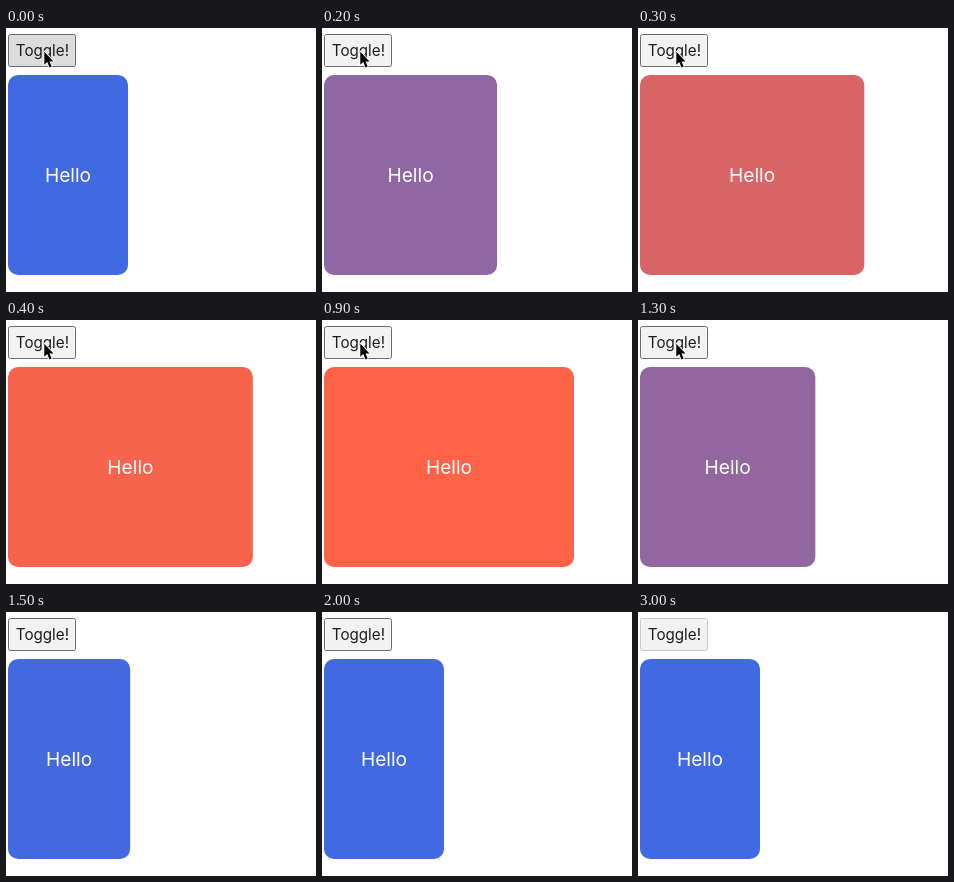
These frames come from a looping animation (310x264 px, 3.2 s). An HTML page:

```html
<!DOCTYPE html>
<html lang="en">
<head>
<meta charset="utf-8">
<title>Toggle</title>
<style>
  html, body { margin: 0; width: 100%; height: 100%; overflow: hidden; background: #fff; }
  svg { display: block; }
  text { font-family: Inter, "Liberation Sans", sans-serif; text-anchor: middle; }
</style>
</head>
<body>
<svg width="310" height="264" viewBox="0 0 310 264">
  <rect id="button" x="2.5" y="6.5" width="67" height="32" rx="2"/>
  <text x="36.4" y="28" font-size="15.2" fill="#1c1c1c">Toggle!</text>
  <rect id="card" x="2" y="47" height="200" rx="10"/>
  <text id="label" y="154" font-size="19.2" fill="#fff">Hello</text>
  <path id="cursor" transform="translate(38.3 23.8)" d="M0 0V13L3 10.3L5.2 15.6L7.4 14.7L5.2 9.6H9.2Z"
        stroke="#fff" stroke-width="1.6" paint-order="stroke"/>
</svg>
<script>
const LOOP = 3200, STEP = 100, DURATION = 400;
const OPEN_AT = 100, CLOSE_AT = 1167;
const BLUE = [65, 105, 225], TOMATO = [255, 99, 71];
const [button, card, label, cursor] =
  ['button', 'card', 'label', 'cursor'].map(id => document.getElementById(id));

const mix = (a, b, k) => a + (b - a) * k;
const bezier = (a, b, u) => 3 * u * (1 - u) * ((1 - u) * a + u * b) + u ** 3;

// CSS "ease": cubic-bezier(.25, .1, .25, 1)
function ease(x) {
  if (x <= 0) return 0;
  if (x >= 1) return 1;
  let lo = 0, hi = 1;
  for (let i = 0; i < 24; i++) {
    const mid = (lo + hi) / 2;
    if (bezier(.25, .25, mid) < x) lo = mid; else hi = mid;
  }
  return bezier(.1, 1, lo);
}

function draw(t) {
  const k = ease((t - OPEN_AT) / DURATION) - ease((t - CLOSE_AT) / DURATION);
  const width = mix(120, 250, k);
  card.setAttribute('width', width);
  card.setAttribute('fill', `rgb(${BLUE.map((c, i) => Math.round(mix(c, TOMATO[i], k)))})`);
  label.setAttribute('x', 2 + width / 2);

  const pressed = t < 100 || (t >= 1100 && t < 1200);
  button.setAttribute('fill', pressed ? '#dcdcdc' : '#f2f2f2');
  button.setAttribute('stroke', t < 2500 ? '#6b6b6b' : t < 2600 ? '#a0a0a0' : '#cacaca');
  cursor.setAttribute('visibility', t < 1500 ? 'visible' : 'hidden');
}

// The picture advances ten times a second.
const start = performance.now();
function tick() {
  const t = (performance.now() - start) % LOOP;
  draw(Math.floor(t / STEP) * STEP);
  requestAnimationFrame(tick);
}
tick();
</script>
</body>
</html>
```
